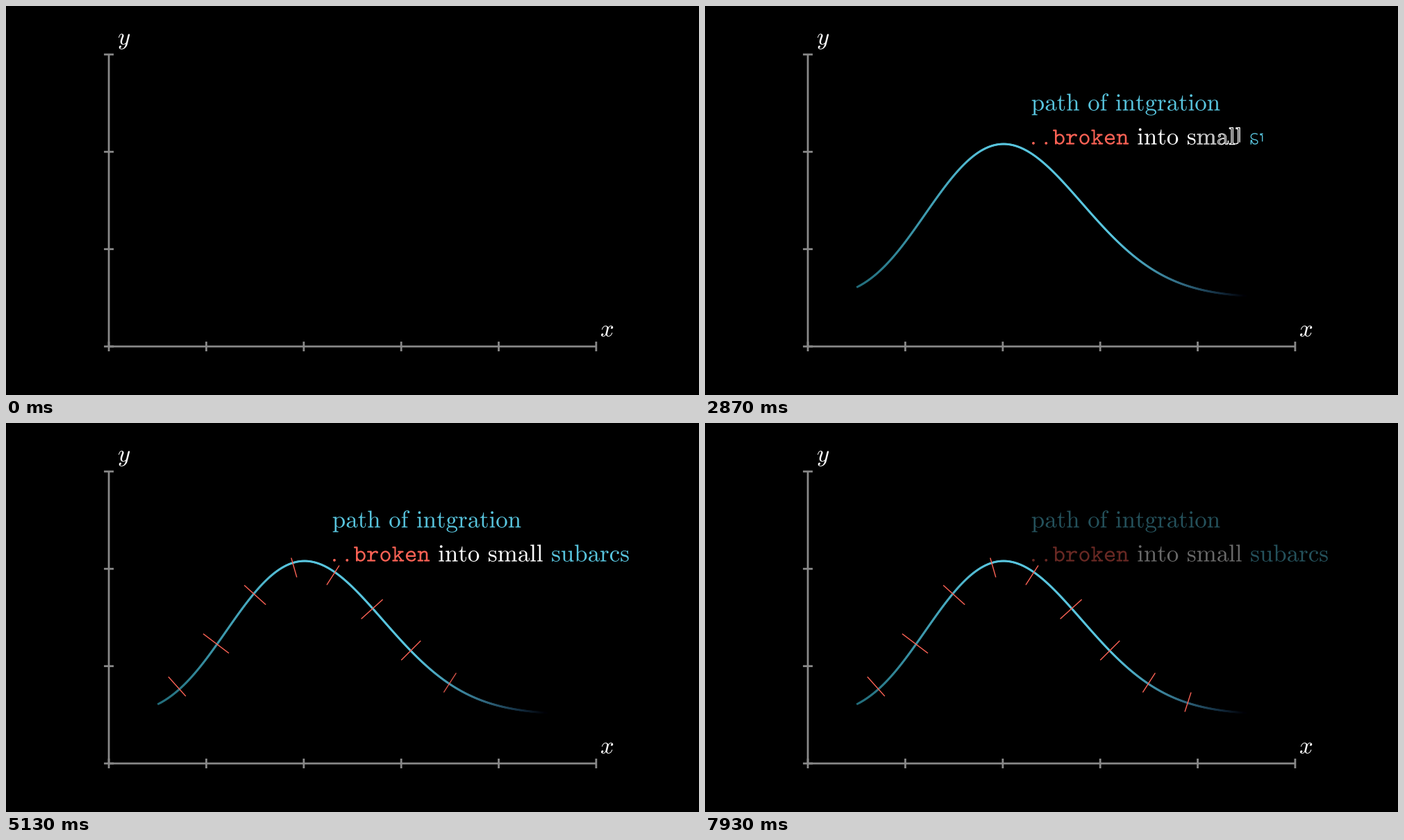
Write a matplotlib script that moves like this. It is 998 px wide and 561 px high and loops after 8000 ms.

```python
import numpy as np
import matplotlib.pyplot as plt
from matplotlib.animation import FuncAnimation
from matplotlib.collections import LineCollection
from matplotlib.patches import PathPatch
from matplotlib.path import Path
from matplotlib.textpath import TextToPath
from matplotlib.transforms import Affine2D

WIDTH, HEIGHT, DPI = 998, 561, 64
LOOP_MS, INTERVAL_MS, STEPS_PER_SECOND = 8000, 20, 15
BLUE, RED, WHITE, GRAY = "#58C4DD", "#FC6255", "#FFFFFF", "#888888"
ORIGIN_X, ORIGIN_Y, UNIT = 148.1, 491.0, 140.36
EM, MONO_PITCH = 34.9, 0.525
THIN, THICK = 1.4, 2.8

# Schedule in steps, 15 per second
CURVE_START, CURVE_LENGTH = 0, 9
TITLE_START, TITLE_LENGTH = 9, 15
LINE_START, LINE_LENGTH = 24, 30
CUTS_START, CUT_LENGTH = 54, 3
FADE_START, FADE_LENGTH = 111, 15

plt.rcParams["mathtext.fontset"] = "cm"
fig = plt.figure(figsize=(WIDTH / DPI, HEIGHT / DPI), dpi=DPI, facecolor="black")
ax = fig.add_axes([0, 0, 1, 1])
ax.set(xlim=(0, WIDTH), ylim=(HEIGHT, 0))
ax.axis("off")


def points(pixels):
    return pixels * 72 / DPI


def smooth(t):
    """Sigmoid easing normalised to run from 0 to 1."""
    sigmoid = lambda v: 1 / (1 + np.exp(-v))
    edge = sigmoid(-5)
    return np.clip((sigmoid(10 * (t - 0.5)) - edge) / (1 - 2 * edge), 0, 1)


def progress(step, start, length):
    return float(np.clip((step - start) / length, 0, 1))


def to_pixels(x, y):
    return np.column_stack([ORIGIN_X + UNIT * x, ORIGIN_Y - UNIT * y])


def draw_line(xs, ys, color, width, **kwargs):
    return ax.plot(xs, ys, color=color, lw=points(width), snap=False,
                   solid_capstyle="butt", **kwargs)[0]


def draw_axes():
    right, top = ORIGIN_X + 5 * UNIT, ORIGIN_Y - 3 * UNIT
    draw_line([ORIGIN_X, right], [ORIGIN_Y] * 2, GRAY, THICK)
    draw_line([ORIGIN_X] * 2, [ORIGIN_Y, top], GRAY, THICK)
    for i in range(6):
        x = ORIGIN_X + i * UNIT
        draw_line([x, x], [ORIGIN_Y - 7, ORIGIN_Y + 7], GRAY, THICK)
    for i in range(4):
        y = ORIGIN_Y - i * UNIT
        draw_line([ORIGIN_X - 7, ORIGIN_X + 7], [y, y], GRAY, THICK)


def partial_outline(loops, share):
    """First share of the total outline length, loop after loop."""
    lengths = [np.r_[0, np.cumsum(np.hypot(*np.diff(loop, axis=0).T))]
               for loop in loops]
    left = share * sum(s[-1] for s in lengths)
    parts = []
    for loop, s in zip(loops, lengths):
        end = min(left, s[-1])
        if end <= 0:
            break
        grid = np.append(s[s < end], end)
        parts.append(Path(np.column_stack([np.interp(grid, s, loop[:, 0]),
                                           np.interp(grid, s, loop[:, 1])])))
        left -= end
    return Path.make_compound_path(*parts)


class Glyph:
    def __init__(self, path, color):
        self.path = path
        self.loops = path.to_polygons(closed_only=False)
        self.color = color
        self.patch = ax.add_patch(PathPatch(path, lw=0, fc=color, ec="none",
                                            snap=False))

    def show(self, t, opacity=1):
        """Trace the border in the first half, fill it in the second."""
        self.patch.set_visible(t > 0 and opacity > 0)
        if t <= 0:
            return
        if t < 0.5:
            self.patch.set_path(partial_outline(self.loops, 2 * t))
            fill, width = 0, THIN
        else:
            self.patch.set_path(self.path)
            fill = 2 * t - 1
            width = THIN * (1 - fill)
        self.patch.set_facecolor((self.color, fill * opacity))
        self.patch.set_edgecolor((self.color, opacity) if width > 0 else "none")
        self.patch.set_linewidth(points(width))


def typeset(tex, left, baseline, colors):
    """Glyphs of a formula whose ink starts at left; one colour or one each."""
    engine = TextToPath()
    placed, shapes, _ = engine.get_glyphs_mathtext(
        ax.title.get_fontproperties(), tex)
    paths = []
    for key, x, y, size in placed:
        vertices, codes = shapes[key]
        paths.append(Path(np.asarray(vertices) * size + [x, y], codes))
    scale = EM / engine.FONT_SCALE
    place = Affine2D().translate(-paths[0].get_extents().x0, 0)
    place = place.scale(scale, -scale).translate(left, baseline)
    if isinstance(colors, str):
        colors = [colors] * len(paths)
    return [Glyph(p.transformed(place), c) for p, c in zip(paths, colors)]


def write(glyphs, t, opacity):
    lag = min(4 / (len(glyphs) + 1), 0.2)
    span = 1 + lag * (len(glyphs) - 1)
    for i, glyph in enumerate(glyphs):
        glyph.show(float(np.clip(t * span - i * lag, 0, 1)) if t < 1 else 1, opacity)


def height(x):
    """Lopsided bell, steeper on the left of its peak."""
    d = x - 2.008
    return 0.5 + 1.58 * np.exp(-(0.7 + 0.11 * np.exp(-0.98 * d)) * d ** 2)


STOPS = [0, 0.34, 0.66, 0.86, 0.94, 1]
SHADES = np.array([(34, 108, 122), (88, 196, 221), (88, 196, 221),
                   (44, 95, 118), (18, 42, 60), (0, 0, 5)]) / 255
PIECES = 200
ramp = np.linspace(0, 1, PIECES - 1)
curve_colors = np.column_stack([np.interp(ramp, STOPS, c) for c in SHADES.T])


def draw_curve(share):
    if share <= 0:
        curve.set_segments([])
        return
    x = np.linspace(0.5, 0.5 + 4 * share, PIECES + 1)
    p = to_pixels(x, height(x))
    # Neighbouring pieces overlap so that no seams show
    curve.set_segments(np.stack([p[:-2], p[1:-1], p[2:]], axis=1))


GAP = r"\hspace{0.38}"

draw_axes()
typeset("$y$", 162, 55.7, WHITE)
typeset("$x$", 857, 476.7, WHITE)

curve = ax.add_collection(LineCollection([], colors=curve_colors,
                                         linewidths=points(THICK)))

title = typeset(rf"$\mathrm{{path}}{GAP}\mathrm{{of}}{GAP}\mathrm{{intgration}}$",
                470.7, 150.8, BLUE)
# The dots stand apart, as a formula would space them like punctuation
line = [glyph for i in range(2)
        for glyph in typeset(r"$\mathtt{.}$", 471 + i * MONO_PITCH * EM, 199.8, RED)]
line += typeset(rf"$\mathtt{{broken}}{GAP}\mathrm{{into}}{GAP}"
                rf"\mathrm{{small}}{GAP}\mathrm{{subarcs}}$",
                501, 199.8, [RED] * 6 + [WHITE] * 9 + [BLUE] * 7)

# Middle height and sideways lean of each cut across the curve
CUTS = [(380, -12.5), (318, -18.5), (248, -15.5), (208.5, -4), (219.5, 9),
        (268.5, 15.5), (328, 14), (374.5, 9), (402.5, 4.5)]
cuts = []
for i, (y, lean) in enumerate(CUTS):
    x = ORIGIN_X + (0.7 + 0.4 * i) * UNIT
    cuts.append(draw_line([x + lean, x - lean], [y - 14, y + 14], RED, THIN, zorder=3))


def update(frame):
    # The motion advances in whole steps; the offset absorbs the finer frame grid
    step = int(frame * INTERVAL_MS * STEPS_PER_SECOND / 1000 + 0.25)
    draw_curve(smooth(progress(step, CURVE_START, CURVE_LENGTH)))
    opacity = 1 - smooth(progress(step, FADE_START, FADE_LENGTH))
    write(title, progress(step, TITLE_START, TITLE_LENGTH), opacity)
    write(line, progress(step, LINE_START, LINE_LENGTH), opacity)
    for i, cut in enumerate(cuts):
        start = CUTS_START + i * CUT_LENGTH
        cut.set_alpha(smooth(progress(step, start, CUT_LENGTH)))


animation = FuncAnimation(fig, update, frames=LOOP_MS // INTERVAL_MS,
                          interval=INTERVAL_MS, repeat=True, repeat_delay=0)
plt.show()
```
